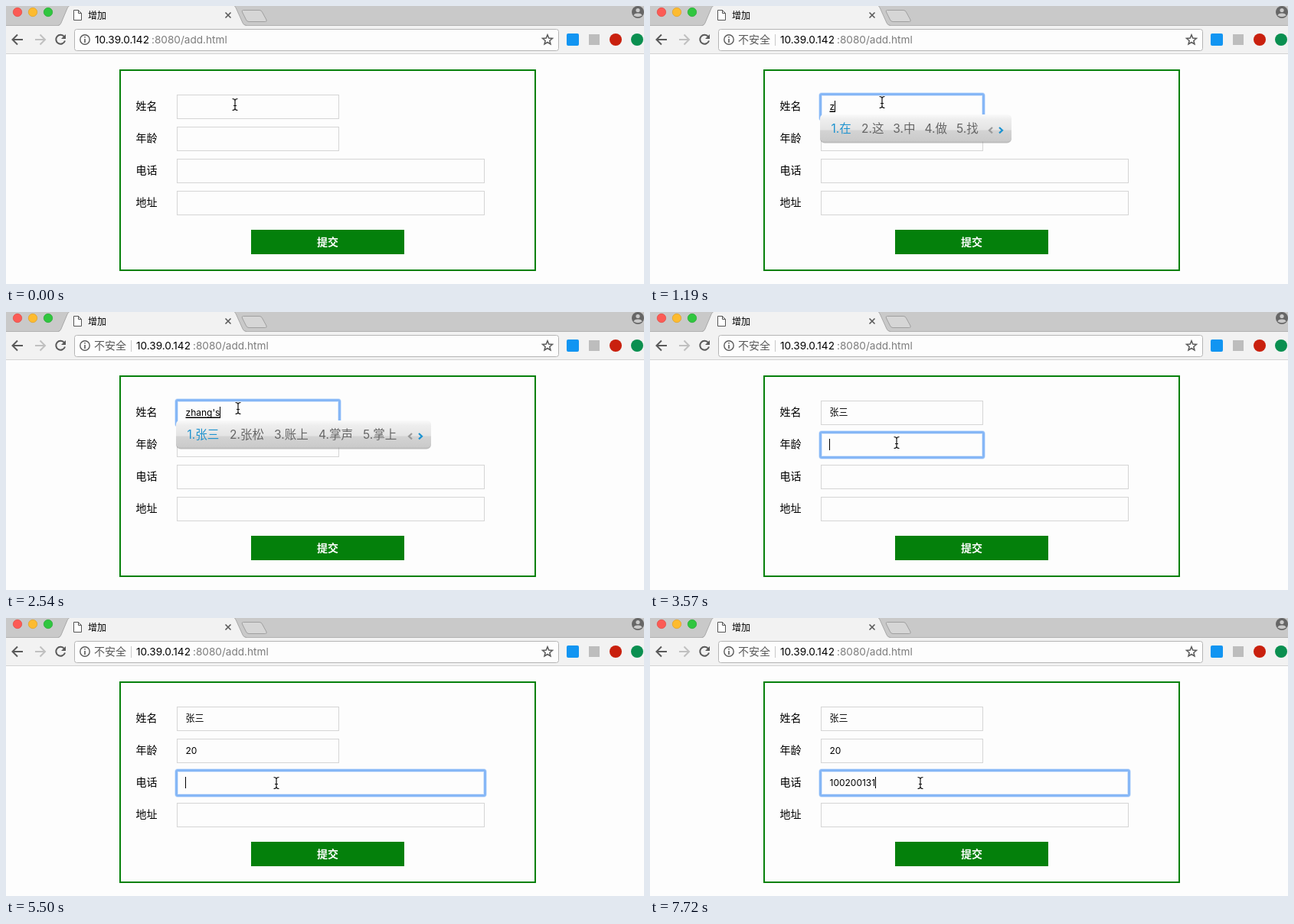
These frames come from a looping animation (833x364 px, 8000 ms). An HTML page:

```html
<!DOCTYPE html>
<html lang="zh-CN">
<head>
<meta charset="utf-8">
<title>增加</title>
<style>
  html, body { margin: 0; width: 100%; height: 100%; overflow: hidden; background: #fdfdfd; }
  svg { display: block; }
  text {
    font-family: Inter, "Noto Sans CJK SC", "Noto Sans CJK", sans-serif;
    font-feature-settings: "calt" 0;
    white-space: pre;
  }
  .label { font-size: 14px; }
  .value { font-size: 12px; }
  .url { font-size: 13.6px; }
  .cand { font-size: 15.5px; fill: #666; }
  .line { fill: none; stroke: #5a5a5a; stroke-width: 2; }
</style>
</head>
<body>
<svg id="stage" width="833" height="364" viewBox="0 0 833 364">
  <defs>
    <linearGradient id="bar" x1="0" y1="0" x2="0" y2="1">
      <stop offset="0" stop-color="#fafafa"/>
      <stop offset=".18" stop-color="#eeeeee"/>
      <stop offset=".56" stop-color="#e4e4e4"/>
      <stop offset=".6" stop-color="#d3d3d3"/>
      <stop offset="1" stop-color="#cacaca"/>
    </linearGradient>
  </defs>

  <!-- tab strip -->
  <rect width="833" height="26" fill="#c9c9c9"/>
  <rect y="25" width="833" height="1" fill="#b2b2b2"/>
  <rect y="26" width="833" height="36" fill="#f2f2f2"/>
  <rect y="62" width="833" height="1" fill="#d2d2d2"/>
  <path d="M68 26Q71 25 72 22L80 3Q81 0 84 -1H297Q299 0 300 2L309 22Q310 25 314 26Z" fill="#f2f2f2"/>
  <path d="M68 25.5Q71 25 72 22L80 3Q81 0 84 -1M297 -1Q299 0 300 2L309 22Q310 25 314 25.5" fill="none" stroke="#a8a8a8"/>
  <path d="M309.500 5.500H331Q333.500 5.500 334.500 8L340 18Q341 20.500 338.500 20.500H317Q314.500 20.500 313.500 18L308.500 8Q307.500 5.500 309.500 5.500Z" fill="#d6d6d6" stroke="#a0a0a0"/>
  <circle cx="15" cy="8" r="5.700" fill="#fc5b55" stroke="#e1483f" stroke-width=".7"/>
  <circle cx="35" cy="8" r="5.700" fill="#fdbb2f" stroke="#dfa023" stroke-width=".7"/>
  <circle cx="55" cy="8" r="5.700" fill="#30c63f" stroke="#22a830" stroke-width=".7"/>
  <path d="M88.500 5.500H94.500L98.500 9.500V18.500H88.500ZM94.500 5.500V9.500H98.500" fill="#fff" stroke="#555"/>
  <text x="107" y="16.500" font-size="12">增加</text>
  <path d="M286.500 8.500L293.500 15.500M293.500 8.500L286.500 15.500" class="line" style="stroke-width:1.6"/>
  <circle cx="825" cy="8" r="8" fill="#666"/>
  <circle cx="825" cy="5.500" r="2.600" fill="#c9c9c9"/>
  <path d="M819.500 12.500Q820 9.500 825 9.500T830.500 12.500Q825 16 819.500 12.500Z" fill="#c9c9c9"/>

  <!-- toolbar -->
  <path d="M22 44H9M15 37.500L8.500 44L15 50.500" class="line"/>
  <path d="M38 44H51M44.500 37.500L51 44L44.500 50.500" class="line" style="stroke:#c0c0c0"/>
  <path d="M76 40A6 6 0 1 0 77 45.500" class="line"/>
  <path d="M78 37V43H72Z" fill="#5a5a5a"/>
  <rect x="89.500" y="30.500" width="632" height="28" rx="3" fill="#fdfdfd" stroke="#b5b5b5"/>
  <circle cx="103" cy="44" r="6.200" class="line" style="stroke-width:1.4"/>
  <path d="M103 40V41.600M103 43V48" class="line" style="stroke-width:1.6"/>
  <g id="warn">
    <text x="115" y="49" class="label" fill="#5a5a5a">不安全</text>
    <rect x="163" y="37" width="1" height="15" fill="#c8c8c8"/>
  </g>
  <g id="address">
    <text x="116" y="49" class="url">10.39.0.142</text>
    <text x="190" y="49" class="url" fill="#7c7c7c">:8080/add.html</text>
  </g>
  <path id="star" class="line" style="stroke-width:1.5"/>
  <rect x="732" y="36" width="16" height="16" rx="2" fill="#1195f2"/>
  <rect x="761" y="37" width="14" height="14" fill="#bdbdbd"/>
  <circle cx="796" cy="44" r="8" fill="#c9200e"/>
  <circle cx="824" cy="44" r="8" fill="#0a8f50"/>

  <!-- form -->
  <rect x="149" y="84" width="542" height="262" fill="none" stroke="#06800b" stroke-width="2"/>
  <g id="form"></g>
  <rect x="320" y="293" width="200" height="32" fill="#04800b"/>
  <text x="406" y="314" class="label" font-weight="700" fill="#fff">提交</text>

  <g id="focus" fill="none" stroke="#7fb3f7">
    <rect stroke-width="5" opacity=".3" rx="2"/>
    <rect stroke-width="3" opacity=".9" rx="1.500"/>
  </g>
  <g id="values"></g>
  <rect id="under" height="1.500"/>
  <rect id="caret" width="1" height="15"/>

  <g id="popup">
    <rect id="shade" x="222" y="146" height="33.500" rx="6" fill="#888" opacity=".55"/>
    <rect id="panel" x="222" y="142" height="35.500" rx="5" fill="url(#bar)"/>
    <g id="cands"></g>
    <g id="arrows" fill="none" stroke-width="2.200">
      <path d="M2.500 159L-1.500 162.700L2.500 166.400" stroke="#9a9a9a"/>
      <path d="M11.500 159L15.500 162.700L11.500 166.400" stroke="#1b93d2"/>
    </g>
  </g>

  <g id="mouse" fill="none">
    <path d="M-4 -7.500Q-.5 -7.500 0 -5.500Q.5 -7.500 4 -7.500M0 -6V6M-4 7.500Q-.5 7.500 0 5.500Q.5 7.500 4 7.500M-2 1.500H2" stroke="#fff" stroke-width="2.600" opacity=".8"/>
    <path d="M-3.500 -7.500Q-.5 -7.500 0 -5.500Q.5 -7.500 3.500 -7.500M0 -6V6M-3.500 7.500Q-.5 7.500 0 5.500Q.5 7.500 3.500 7.500M-2 1.500H2" stroke="#111" stroke-width="1.200"/>
  </g>
</svg>
<script>
const LOOP = 8000;
const $ = id => document.getElementById(id);

function add(parent, tag, attrs, text = '') {
  const el = document.createElementNS('http://www.w3.org/2000/svg', tag);
  set(el, attrs);
  el.textContent = text;
  return parent.appendChild(el);
}
function set(el, attrs) {
  for (const k in attrs) el.setAttribute(k, attrs[k]);
}
const show = (el, on) => { el.style.display = on ? '' : 'none'; };

const rows = ['姓名', '年龄', '电话', '地址'].map((label, i) => ({
  label, y: 116 + 42 * i, w: i < 2 ? 212 : 402
}));
for (const r of rows) {
  add($('form'), 'text', { x: 169.5, y: r.y + 20, class: 'label' }, r.label);
  add($('form'), 'rect', {
    x: 223.5, y: r.y + .5, width: r.w - 1, height: 31, fill: '#fdfdfd', stroke: '#d5d5d5'
  });
  r.text = add($('values'), 'text', { x: 234.5, y: r.y + 20, class: 'value' });
}

const star = [...Array(10)].map((_, i) => {
  const a = Math.PI * (i / 5 - .5), r = i % 2 ? 3 : 6.8;
  return (707 + r * Math.cos(a)).toFixed(2) + ' ' + (44.5 + r * Math.sin(a)).toFixed(2);
});
set($('star'), { d: 'M' + star.join('L') + 'Z' });

const candidates = [...Array(5)].map((_, i) =>
  add($('cands'), 'text', { y: 166, class: 'cand', style: i ? '' : 'fill:#1f93cf' }));

// Each step changes part of the state.
const steps = [
  [0, { mouse: [299, 129], focus: -1, caret: 0, vals: ['', '', ''], compose: 0, list: '', warn: 0 }],
  [150, { mouse: [303, 126], focus: 0, caret: 1 }],
  [750, { caret: 0 }],
  [900, { vals: ['z', '', ''], compose: 1, caret: 1 }],
  [1050, { list: '在 这 中 做 找', warn: 1 }],
  [1340, { vals: ['zh', '', ''], list: '这 中 找 只 着' }],
  [1490, { vals: ['zha', '', ''], list: '炸 扎 查 眨 渣' }],
  [1940, { vals: ['zhan', '', ''], list: '站 占 战 展 沾' }],
  [2240, { vals: ['zhang', '', ''], list: '张 长 章 掌 涨' }],
  [2390, { vals: ["zhang's", '', ''] }],
  [2540, { list: '张三 张松 账上 掌声 掌上' }],
  [2840, { vals: ['张三', '', ''], compose: 0, list: '' }],
  [3130, { mouse: [307, 136] }],
  [3270, { mouse: [315, 155] }],
  [3420, { mouse: [321, 169] }],
  [3570, { mouse: [322, 171], focus: 1 }],
  [4170, { caret: 0 }],
  [4620, { vals: ['张三', '2', ''], caret: 1 }],
  [4760, { vals: ['张三', '20', ''] }],
  [5200, { mouse: [333, 186] }],
  [5350, { mouse: [350, 212], focus: 2 }],
  [5500, { mouse: [353, 216] }],
  [5950, { caret: 0 }]
];
const phone = '100200131';
[6100, 6250, 6700, 6990, 7140, 7280, 7430, 7580, 7720].forEach((t, i) =>
  steps.push([t, { vals: ['张三', '20', phone.slice(0, i + 1)], caret: 1 }]));

function stateAt(t) {
  const s = {};
  for (const [start, change] of steps) if (start <= t) Object.assign(s, change);
  return s;
}

function drawPopup(list) {
  show($('popup'), list);
  if (!list) return;
  const words = list.split(' ');
  const pitch = words[0].length > 1 ? 58 : 41.3;
  const first = words[0].length > 1 ? 292 : 276;
  words.forEach((word, i) => {
    candidates[i].textContent = i + 1 + '.' + word;
    set(candidates[i], { x: i ? first + (i - 1) * pitch : 236.5 });
  });
  const width = words[0].length > 1 ? 333 : 250;
  set($('shade'), { width });
  set($('panel'), { width });
  set($('arrows'), { transform: `translate(${222 + width - 27.500} 0)` });
}

function draw(t) {
  const s = stateAt(t);
  s.vals.forEach((v, i) => { rows[i].text.textContent = v; });
  show($('warn'), s.warn);
  set($('address'), { transform: `translate(${s.warn ? 54 : 0} 0)` });
  set($('mouse'), { transform: `translate(${s.mouse})` });
  drawPopup(s.list);

  const row = rows[s.focus];
  show($('focus'), row);
  show($('caret'), row && s.caret);
  show($('under'), s.compose);
  if (!row) return;
  for (const el of $('focus').children)
    set(el, { x: 222.5, y: row.y - .5, width: row.w + 1, height: 33 });
  const len = s.vals[s.focus] ? row.text.getComputedTextLength() : 0;
  set($('caret'), { x: Math.round(234 + len), y: row.y + 8 });
  set($('under'), { x: 234.5, y: row.y + 21.5, width: len });
}

const begin = performance.now();
function frame() {
  draw((performance.now() - begin) % LOOP);
  requestAnimationFrame(frame);
}
frame();
</script>
</body>
</html>
```
